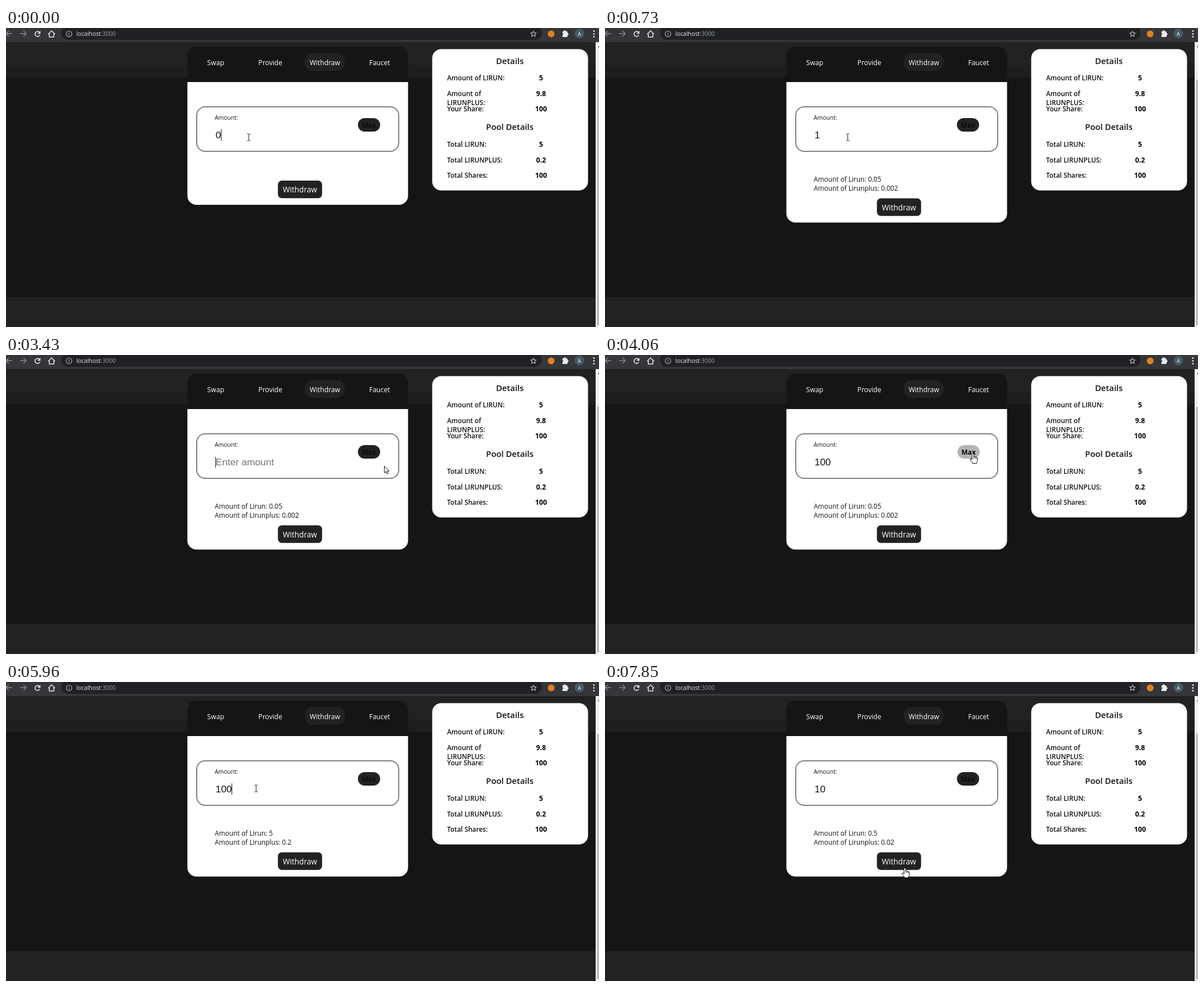
An HTML page with a canvas that plays this animation: 1054x531 px, repeating every 8000 ms.

```html
<!DOCTYPE html>
<html lang="en">
<head>
<meta charset="utf-8">
<title>Withdraw</title>
<style>
html, body { margin: 0; width: 100%; height: 100%; overflow: hidden; background: #141615; }
canvas { display: block; }
</style>
</head>
<body>
<canvas id="stage" width="1054" height="531"></canvas>
<script>
const ctx = document.getElementById('stage').getContext('2d');
const LOOP = 8000;
const UI = '"Open Sans", "Noto Sans", sans-serif';
const FIELD = '"Liberation Sans", Arial, sans-serif';
const DARK = '#222222', INK = '#141615', ICON = '#e8eaed';

// [time, field value, caret visible]
const field = [
  [0, '0', 1], [150, '0', 0], [270, '', 1], [730, '1', 0], [1300, '1', 1],
  [1870, '1', 0], [2390, '1', 1], [2640, '', 1], [2910, '', 0], [3430, '', 1],
  [3940, '', 0], [4060, '100', 0], [5960, '100', 1], [6500, '100', 0],
  [6620, '10', 1], [7040, '10', 0], [7580, '10', 1], [7700, '10', 0]
];
// [time, first amount, second amount]
const amounts = [[0, '', ''], [730, '0.05', '0.002'], [4620, '5', '0.2'], [6920, '0.5', '0.02']];
// [time, pointer shape, x, y]
const mouse = [
  [0, 'beam', 431, 194], [1180, 'beam', 446, 194], [1300, 'beam', 454, 194],
  [3310, 'beam', 560, 196], [3430, 'arrow', 672, 197], [3550, 'hand', 660, 181],
  [3670, 'hand', 656, 178], [3790, 'hand', 655, 176], [3940, 'hand', 654, 175],
  [4890, 'hand', 645, 173], [5010, 'beam', 610, 177], [5130, 'beam', 575, 180],
  [5280, 'beam', 520, 180], [5400, 'beam', 463, 180], [5550, 'beam', 455, 181],
  [5700, 'beam', 444, 189], [7340, 'arrow', 490, 260], [7460, 'arrow', 567, 368],
  [7580, 'arrow', 545, 350], [7700, 'hand', 536, 333], [7850, 'hand', 533, 330]
];
const at = (track, t) => track.filter(step => step[0] <= t).pop();

function rect(x, y, w, h, color) {
  ctx.fillStyle = color;
  ctx.fillRect(x, y, w, h);
}
function round(x, y, w, h, r, color) {
  ctx.fillStyle = color;
  ctx.beginPath();
  ctx.roundRect(x, y, w, h, r);
  ctx.fill();
}
function disc(x, y, r, color) {
  ctx.fillStyle = color;
  ctx.beginPath();
  ctx.arc(x, y, r, 0, 7);
  ctx.fill();
}
function text(str, x, y, size, color, { weight = 400, align = 'left', family = UI } = {}) {
  ctx.font = `${weight} ${size}px ${family}`;
  ctx.textAlign = align;
  ctx.fillStyle = color;
  ctx.fillText(str, x, y);
}
function shape(d, x, y, stroke, width, fill) {
  const path = new Path2D(d);
  ctx.save();
  ctx.translate(x, y);
  if (fill) { ctx.fillStyle = fill; ctx.fill(path); }
  ctx.strokeStyle = stroke;
  ctx.lineWidth = width;
  ctx.lineJoin = 'round';
  ctx.stroke(path);
  ctx.restore();
}

function toolbar() {
  rect(0, 0, 1054, 25, '#35363a');
  round(98, -4, 854, 25, 12, '#202124');
  shape('M6 0H-5M0-5L-5 0L0 5', 5, 10, '#87898c', 1.4);
  shape('M-5 0H6M1-5L6 0L1 5', 30, 10, '#87898c', 1.4);
  shape('M4 2A4.4 4.4 0 1 1 3-3.2', 56, 10.5, ICON, 1.6);
  shape('M5-5V-.5H.5Z', 56, 10.5, ICON, .5, ICON);
  shape('M-6 1L0-5L6 1M-4 0V6H4V0', 81, 10, ICON, 1.5);
  shape('M5 0A5 5 0 1 1-5 0A5 5 0 1 1 5 0M0-1V3M0-3V-1.8', 112, 10.5, '#aeb1b5', 1.1);
  text('localhost', 125, 14, 10.4, ICON);
  text(':3000', 168.5, 14, 10.4, '#9aa0a6');
  shape('M0-5L1.5-1.7L5-1.5L2.3.9L3.2 4.5L0 2.5L-3.2 4.5L-2.3.9L-5-1.5L-1.5-1.7Z', 937.5, 10.5, ICON, 1);
  disc(969, 10.5, 6, '#e2801f');
  round(989, 6, 9, 10, 1, ICON);
  disc(993, 6, 1.9, ICON);
  disc(998, 11, 1.9, ICON);
  disc(989, 11, 1.4, '#35363a');
  disc(1019, 10, 8.5, '#455a64');
  text('A', 1019, 13.5, 9, '#ffffff', { align: 'center' });
  for (const y of [5.5, 10.5, 15.5]) disc(1045, y, 1.4, ICON);
}

function backdrop() {
  rect(0, 25, 1054, 506, INK);
  rect(0, 25, 1054, 41, DARK);
  rect(0, 66, 1054, 22, '#1c1f1e');
  rect(0, 478, 1054, 53, DARK);
  rect(1048, 25, 6, 506, '#f1f1f1');
  rect(1050, 92, 4, 436, '#c1c1c1');
  shape('M0 0L2-2.5V0Z', 1052, 34, '#505050', .5, '#505050');
}

function details() {
  round(757.5, 37.5, 277, 251, 16, '#ffffff');
  const head = { weight: 600, align: 'center' };
  text('Details', 895.5, 63.5, 14.8, '#111111', head);
  text('Pool Details', 895.5, 181, 14.8, '#111111', head);
  const rows = [
    ['Amount of LIRUN:', '5', 93], ['Amount of', '9.8', 120.5], ['LIRUNPLUS:', '', 137],
    ['Your Share:', '100', 148], ['Total LIRUN:', '5', 211],
    ['Total LIRUNPLUS:', '0.2', 238.5], ['Total Shares:', '100', 266]
  ];
  for (const [label, value, y] of rows) {
    text(label, 784, y, 11.8, '#111111', { weight: 600 });
    text(value, 951, y, 12.2, '#000000', { weight: 700, align: 'center' });
  }
}

function card(t) {
  const [, first, second] = at(amounts, t);
  const [, value, caret] = at(field, t);
  const [, pointer, mouseX] = at(mouse, t);
  const drop = first ? 31.5 : 0;

  round(322.4, 33, 392.2, 63, [16, 16, 0, 0], INK);
  round(322.4, 96, 392.2, 218 + drop, [0, 0, 16, 16], '#ffffff');
  round(531, 44.5, 71, 31.5, 14, DARK);
  ['Swap', 'Provide', 'Withdraw', 'Faucet'].forEach((tab, i) =>
    text(tab, 372.7 + i * 97.1, 66, 12.1, '#ffffff', { align: 'center' }));

  ctx.strokeStyle = '#808080';
  ctx.lineWidth = 2;
  ctx.beginPath();
  ctx.roundRect(339, 140, 359, 79, 15);
  ctx.stroke();
  text('Amount:', 371, 163, 10.3, '#111111');
  text(value || 'Enter amount', 372.6, 195.5, 17.3, value ? '#111111' : '#757575', { family: FIELD });
  if (caret) {
    const x = value ? Math.round(372.6 + ctx.measureText(value).width) : 372;
    rect(x, value ? 180 : 181, 1, value ? 20 : 19, '#111111');
  }

  const hover = pointer === 'hand' && mouseX > 600;
  const shift = hover ? 1 : 0;
  round(625.5 + shift, 160, 39.5, 24, 12, hover ? '#b4b4b4' : DARK);
  text('Max', 645.2 + shift, 176.5, 11.9, hover ? '#000000' : '#0c0c0c', { weight: 700, align: 'center' });

  if (first) {
    text('Amount of Lirun: ' + first, 371, 272.5, 11.85, '#111111');
    text('Amount of Lirunplus: ' + second, 371, 289, 11.85, '#111111');
  }
  round(483.3, 271 + drop, 78.5, 31.3, 7, DARK);
  text('Withdraw', 522.4, 292 + drop, 13.6, '#ffffff', { align: 'center' });
}

function drawPointer(t) {
  const [, kind, x, y] = at(mouse, t);
  if (kind === 'beam') {
    shape('M-2.5-6H-.5L.5-5.5L1.5-6H3.5M.5-5.5V5.5M-2.5 6H-.5L.5 5.5L1.5 6H3.5', x, y, '#222222', 1);
  } else if (kind === 'arrow') {
    shape('M.5.5V12.5L3.3 10L5.2 14.3L7.2 13.4L5.3 9.2H9Z', x, y, '#111111', 1, '#ffffff');
  } else {
    shape('M-1.5 1Q0-1 1.5 1V6Q3 4.8 4 6.4Q5.6 5.4 6.3 7Q8 6.4 8 8.5V12Q8 14 6.5 15.5V17.5H-1V16L-5 11Q-5.5 8.5-3.5 9L-1.5 11Z',
      x, y, '#111111', 1, '#ffffff');
    shape('M1.5 6V9M4 6.4V9.5M6.3 7V9.5', x, y, '#111111', .8);
  }
}

function frame() {
  const t = performance.now() % LOOP;
  backdrop();
  toolbar();
  details();
  card(t);
  drawPointer(t);
  requestAnimationFrame(frame);
}
frame();
</script>
</body>
</html>
```
